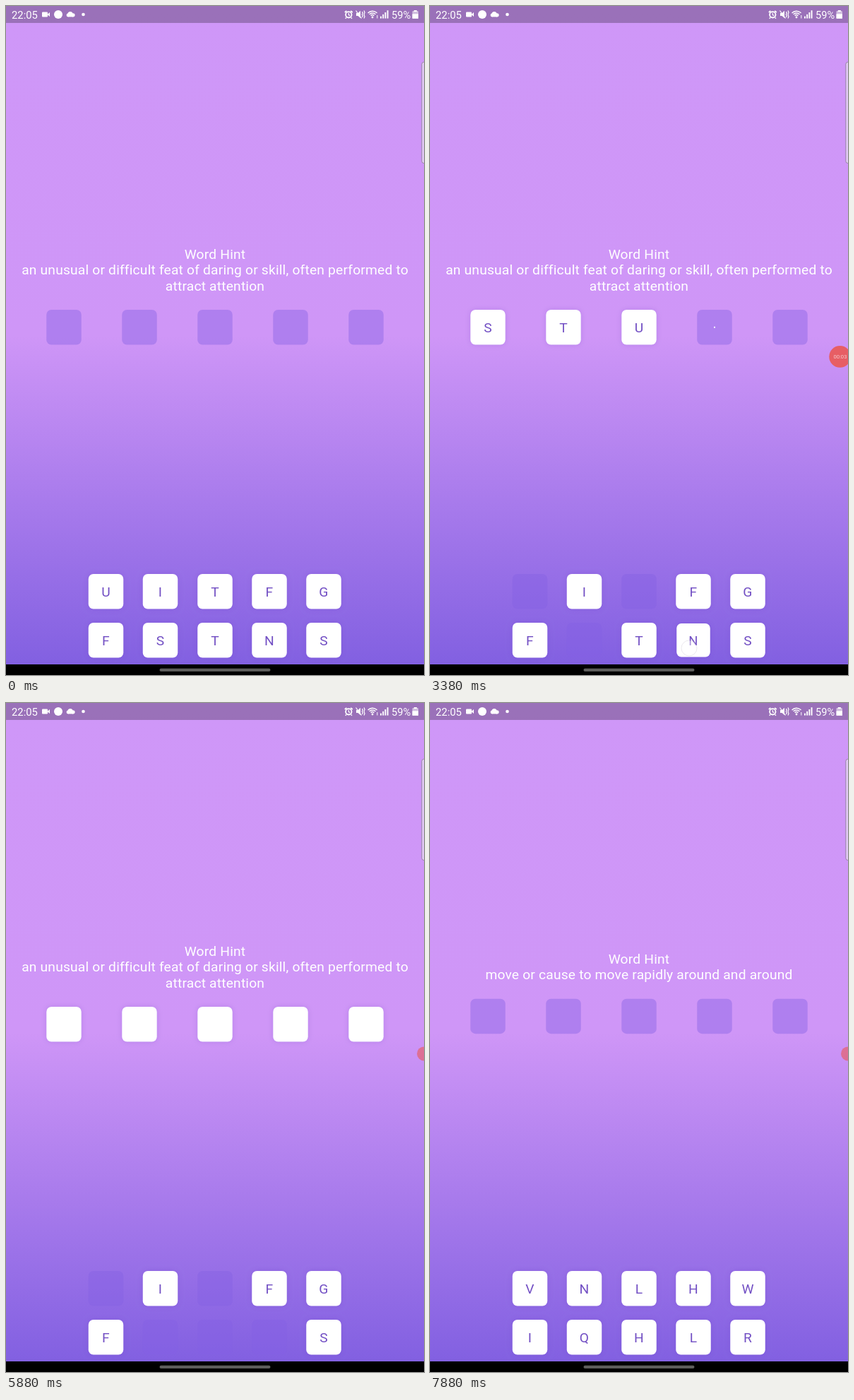
Recreate the animation shown at these times as an HTML page with a canvas. Size 592 px wide and 947 px high, loop 8 s.

```html
<!DOCTYPE html>
<html lang="en">
<head>
<meta charset="utf-8">
<title>Word puzzle</title>
<style>
  html, body { margin: 0; width: 100%; height: 100%; overflow: hidden; background: #000; }
  canvas { display: block; width: 592px; height: 947px; }
</style>
</head>
<body>
<canvas id="stage"></canvas>
<script>
const W = 592, H = 947, NAV = 932, LOOP = 8000, TICK = 125;
const TILE = 49.5, FONT = 19.24, SPACING = '0.185px';
const WON = 6125, NEXT = 7875;
const SLOT_X = [82, 189, 296, 403, 510];
const KEY_X = [141.5, 218.5, 296, 373, 450];
const KEY_Y = [828.8, 897.8];
const INK = '#7350c4', GREEN = '#2cc57a';

const stage1 = {
  hint: ['Word Hint', 'an unusual or difficult feat of daring or skill, often performed to', 'attract attention'],
  hintY: 351, slotY: 454.8, keys: 'UITFGFSTNS'
};
const stage2 = {
  hint: ['Word Hint', 'move or cause to move rapidly around and around'],
  hintY: 362, slotY: 443.4, keys: 'VNLHWIQHLR'
};

// Each pick moves one key into the next slot.
const MOVE = 250;
const picks = [
  { key: 6, at: 740, touch: [212, 908] },
  { key: 2, at: 1490, touch: [291, 842] },
  { key: 0, at: 2740, touch: [136, 839] },
  { key: 8, at: 3365, touch: [367, 909] },
  { key: 7, at: 4240, touch: [291, 908] }
];
const SPIN_AT = 4645, SPIN_GAP = 250, SPIN = 230;

const canvas = document.getElementById('stage');
const ctx = canvas.getContext('2d');
const dpr = window.devicePixelRatio || 1;
canvas.width = W * dpr;
canvas.height = H * dpr;

const clamp = v => Math.max(0, Math.min(1, v));
const mix = (a, b, p) => a + (b - a) * p;

function roundRect(x, y, w, h, r) {
  ctx.beginPath();
  ctx.roundRect(x, y, w, h, r);
}

function disc(x, y, r, color) {
  ctx.fillStyle = color;
  ctx.beginPath();
  ctx.arc(x, y, r, 0, Math.PI * 2);
  ctx.fill();
}

function line(width, ...pts) {
  ctx.lineWidth = width;
  ctx.beginPath();
  pts.forEach(([x, y], i) => i ? ctx.lineTo(x, y) : ctx.moveTo(x, y));
  ctx.stroke();
}

// y is the middle of the capital letters.
function text(str, x, y, size, color, weight = 400, align = 'center', spacing = SPACING) {
  ctx.font = `${weight} ${size}px Roboto, sans-serif`;
  ctx.letterSpacing = spacing;
  ctx.textAlign = align;
  ctx.fillStyle = color;
  ctx.fillText(str, x, y + size * 0.356);
}

function emptySlot(x, y) {
  ctx.fillStyle = 'rgba(131,96,226,0.42)';
  roundRect(x - TILE / 2, y - TILE / 2, TILE, TILE, 7);
  ctx.fill();
}

function tile(x, y, letter, scale = 1, angle = 0, ink = 1) {
  if (scale <= 0) return;
  ctx.save();
  ctx.translate(x, y);
  ctx.rotate(angle);
  ctx.scale(scale, scale);
  ctx.shadowColor = 'rgba(90,50,180,0.2)';
  ctx.shadowBlur = 9 * dpr * scale;
  ctx.fillStyle = '#fff';
  roundRect(-TILE / 2, -TILE / 2, TILE, TILE, 7);
  ctx.fill();
  ctx.shadowColor = 'transparent';
  ctx.globalAlpha = ink;
  text(letter, 0, 0.3, FONT, INK);
  ctx.restore();
}

function touch(x, y) {
  disc(x, y, 11, 'rgba(255,255,255,0.4)');
  ctx.strokeStyle = 'rgba(60,40,90,0.1)';
  ctx.lineWidth = 1;
  ctx.stroke();
}

function fillScreen(x1, y1, stops) {
  const g = ctx.createLinearGradient(0, 0, x1, y1);
  stops.forEach(([at, color]) => g.addColorStop(at, color));
  ctx.fillStyle = g;
  ctx.fillRect(0, 0, W, NAV);
}

function puzzle(stage, t, moves) {
  fillScreen(0, NAV, [[0, '#cf97f8'], [0.5, '#cf96f7'], [1, '#8260e1']]);
  stage.hint.forEach((s, i) => text(s, W / 2, stage.hintY + i * 22.6, FONT, '#fff'));

  const progress = moves.map(m => clamp((t - m.at) / MOVE));
  [...stage.keys].forEach((letter, i) => {
    const x = KEY_X[i % 5], y = KEY_Y[i / 5 | 0];
    const n = moves.findIndex(m => m.key === i);
    const p = n < 0 ? 0 : progress[n];
    if (p > 0) emptySlot(x, y);
    tile(x, y, letter, 1 - p);
  });

  SLOT_X.forEach((x, i) => {
    emptySlot(x, stage.slotY);
    if (!moves[i]) return;
    const spin = clamp((t - SPIN_AT - i * SPIN_GAP) / SPIN);
    tile(x, stage.slotY, stage.keys[moves[i].key], progress[i],
         spin * Math.PI / 2, clamp(1 - spin * 1.85));
  });

  moves.forEach(m => {
    if (t >= m.at - 115 && t < m.at + 130) touch(...m.touch);
  });
}

function winScreen(t) {
  fillScreen(W, NAV, [[0, '#82f5af'], [0.355, '#82f5af'], [0.855, GREEN], [1, GREEN]]);
  text('Congrats!!! You won', W / 2, 443, 31.08, '#fff');
  ctx.fillStyle = '#fff';
  roundRect(199, 473.5, 194, 38.5, 7);
  ctx.fill();
  text('Go to the next stage', W / 2, 493.3, FONT, GREEN, 500);
  if (t >= 7625) touch(354, 502);
}

function statusBar() {
  ctx.fillStyle = 'rgba(0,0,0,0.255)';
  ctx.fillRect(0, 0, W, 24);
  const white = '#fff';
  text('22:05', 8, 12.5, 14.8, white, 400, 'left', '0px');
  text('59%', 546, 12.5, 14.6, white, 400, 'left', '0px');

  ctx.fillStyle = ctx.strokeStyle = white;
  // camera
  roundRect(51, 8.5, 8, 7, 1);
  ctx.fill();
  ctx.beginPath();
  ctx.moveTo(58.5, 12);
  ctx.lineTo(62, 9);
  ctx.lineTo(62, 15);
  ctx.fill();
  disc(74, 12, 6, white);
  // cloud
  disc(91, 11.5, 3.6, white);
  disc(88, 13, 2.4, white);
  disc(95, 12.8, 2.6, white);
  ctx.fillRect(88, 12.5, 7, 2.9);
  disc(109.5, 12, 2.3, white);

  // alarm clock
  ctx.lineWidth = 1.8;
  ctx.beginPath();
  ctx.arc(485.3, 12.3, 4.2, 0, Math.PI * 2);
  ctx.stroke();
  line(1.7, [479.8, 9], [482.4, 6.8]);
  line(1.7, [490.8, 9], [488.2, 6.8]);
  line(1.2, [485.3, 9.8], [485.3, 12.6], [487.2, 13.6]);
  line(1.5, [481.8, 16.3], [480.8, 17.8]);
  line(1.5, [488.8, 16.3], [489.8, 17.8]);

  // muted speaker
  ctx.beginPath();
  ctx.moveTo(496, 10);
  ctx.lineTo(498.5, 10);
  ctx.lineTo(502, 6.8);
  ctx.lineTo(502, 17);
  ctx.lineTo(498.5, 14);
  ctx.lineTo(496, 14);
  ctx.fill();
  line(1.2, [495.5, 6.5], [503.5, 17.5]);
  line(1.2, [504.3, 8], [505.3, 10], [504.3, 12], [505.3, 14], [504.3, 16]);
  line(1.2, [507, 6.5], [508, 9], [507, 12], [508, 15], [507, 17.5]);

  // wifi
  ctx.lineWidth = 1.4;
  [3.2, 6, 8.8].forEach(r => {
    ctx.beginPath();
    ctx.arc(519, 16, r, -Math.PI * 0.76, -Math.PI * 0.24);
    ctx.stroke();
  });
  disc(519, 16, 1.4, white);
  line(1, [525.8, 13], [525.8, 17.5]);
  // signal
  for (let i = 0; i < 4; i++) {
    const h = 3 + i * 2.8;
    ctx.fillRect(530 + i * 3.2, 17.6 - h, 1.9, h);
  }
  // battery
  ctx.fillRect(577.8, 6, 4, 2);
  ctx.globalAlpha = 0.55;
  roundRect(575.5, 7, 8.5, 11, 1.2);
  ctx.fill();
  ctx.globalAlpha = 1;
  ctx.fillRect(575.5, 11.3, 8.5, 6.4);
}

function edgeHandle() {
  roundRect(588.8, 79.5, 10, 143, 3);
  ctx.fillStyle = 'rgba(240,240,240,0.55)';
  ctx.fill();
  ctx.strokeStyle = 'rgba(100,100,105,0.6)';
  ctx.lineWidth = 0.9;
  ctx.stroke();
}

function navBar() {
  ctx.fillStyle = '#000';
  ctx.fillRect(0, NAV, W, H - NAV);
  ctx.fillStyle = '#5e5e5c';
  roundRect(217.5, 937.8, 157, 4.2, 2.1);
  ctx.fill();
}

function recorder(t) {
  if (t < TICK) return;
  const dock = clamp((t - 3325) / 250);
  const x = mix(577.8, 592, dock), r = mix(16.7, 10, dock);
  ctx.save();
  ctx.globalAlpha = mix(1, 0.62, dock);
  disc(x, 496.4, r, '#e95a58');
  ctx.globalAlpha = 0.85 * (1 - dock);
  const sec = Math.floor((t - TICK) / 1000);
  text('00:0' + sec, x + 0.3, 496.6, 7.6, '#fff', 400, 'center', '0px');
  ctx.restore();
}

function draw(t) {
  ctx.setTransform(dpr, 0, 0, dpr, 0, 0);
  ctx.clearRect(0, 0, W, H);
  if (t < WON) puzzle(stage1, t, picks);
  else if (t < NEXT) winScreen(t);
  else puzzle(stage2, t, []);
  edgeHandle();
  recorder(t);
  statusBar();
  navBar();
}

const start = performance.now();
function loop() {
  const t = (performance.now() - start) % LOOP;
  draw(Math.floor(t / TICK) * TICK);
  requestAnimationFrame(loop);
}
loop();
</script>
</body>
</html>
```
